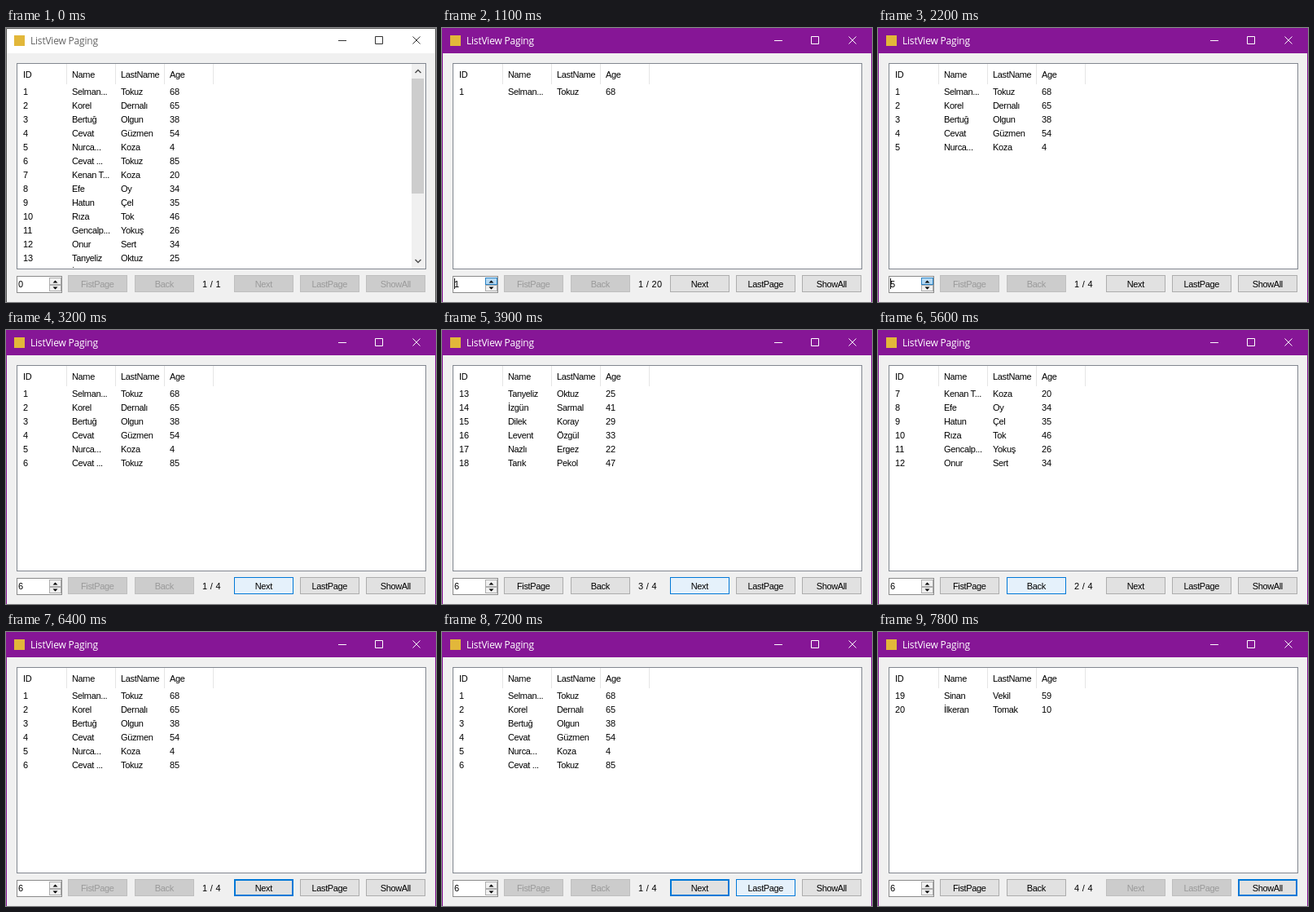
Animation of 528 by 336 pixels, one loop 8 s. Source, as an HTML page:

```html
<!DOCTYPE html>
<html lang="en">
<head>
<meta charset="utf-8">
<title>ListView Paging</title>
<style>
html, body { margin: 0; width: 100%; height: 100%; overflow: hidden; background: #f0f0f0; }
svg { display: block; width: 528px; height: 336px; }
text { font: 11px "Liberation Sans", Arial, sans-serif; fill: #000; letter-spacing: -.35px; }
text.num { letter-spacing: 0; }
text.page { letter-spacing: .3px; }
text.title { font: 12px "Open Sans", "Noto Sans", sans-serif; letter-spacing: -.2px; }
</style>
</head>
<body>
<script>
const LOOP = 8000;
const PURPLE = '#861696', BLUE = '#0078d7';

const people = [
  ['Selman...', 'Tokuz', 68], ['Korel', 'Dernalı', 65], ['Bertuğ', 'Olgun', 38],
  ['Cevat', 'Güzmen', 54], ['Nurca...', 'Koza', 4], ['Cevat ...', 'Tokuz', 85],
  ['Kenan T...', 'Koza', 20], ['Efe', 'Oy', 34], ['Hatun', 'Çel', 35],
  ['Rıza', 'Tok', 46], ['Gencalp...', 'Yokuş', 26], ['Onur', 'Sert', 34],
  ['Tanyeliz', 'Oktuz', 25], ['İzgün', 'Sarmal', 41], ['Dilek', 'Koray', 29],
  ['Levent', 'Özgül', 33], ['Nazlı', 'Ergez', 22], ['Tarık', 'Pekol', 47],
  ['Sinan', 'Vekil', 59], ['İlkeran', 'Tomak', 10]
];

const buttons = [
  ['first', 'FistPage', 76], ['back', 'Back', 158], ['next', 'Next', 280],
  ['last', 'LastPage', 361], ['all', 'ShowAll', 442]
];

// Each step lists only what changes at that time.
const steps = [
  [0, { active: false, size: 0, page: 1, caret: false, spin: '', min: false, hover: '', press: '', focus: '' }],
  [100, { min: true }],
  [200, { min: false }],
  [800, { spin: 'hover' }],
  [1000, { active: true, spin: 'press', caret: true }],
  [1100, { size: 1 }],
  [1200, { spin: 'hover' }],
  [1400, { size: 2, spin: 'press' }],
  [1500, { spin: 'hover' }],
  [1700, { size: 3, spin: 'press' }],
  [1800, { spin: 'hover' }],
  [1900, { size: 4, spin: 'press' }],
  [2000, { spin: 'hover' }],
  [2200, { size: 5, spin: 'press' }],
  [2300, { spin: 'hover' }],
  [2600, { size: 6, spin: 'press' }],
  [2700, { spin: 'hover' }],
  [2800, { spin: '' }],
  [3200, { caret: false, hover: 'next' }],
  [3400, { press: 'next' }],
  [3600, { page: 2, press: '', focus: 'next' }],
  [3800, { press: 'next' }],
  [3900, { page: 3, press: '' }],
  [4300, { page: 4, hover: '', focus: 'all' }],
  [4600, { hover: 'back' }],
  [5100, { page: 3, press: 'back', focus: 'back' }],
  [5200, { press: '' }],
  [5400, { press: 'back' }],
  [5500, { page: 2, press: '' }],
  [5900, { hover: '' }],
  [6000, { hover: 'first' }],
  [6400, { page: 1, hover: '', focus: 'next' }],
  [7200, { hover: 'last' }],
  [7700, { page: 4, hover: '', focus: 'all' }]
];

const NS = 'http://www.w3.org/2000/svg';
const svg = document.createElementNS(NS, 'svg');
svg.setAttribute('viewBox', '0 0 528 336');
document.body.append(svg);

function set(node, attrs) {
  for (const key in attrs) node.setAttribute(key, attrs[key]);
  return node;
}
function add(tag, attrs, parent = svg) {
  return parent.appendChild(set(document.createElementNS(NS, tag), attrs));
}
const rect = (x, y, width, height, fill, parent) =>
  add('rect', { x, y, width, height, fill }, parent);
const box = (x, y, w, h, fill, stroke, parent) =>
  set(rect(x + .5, y + .5, w - 1, h - 1, fill, parent), { stroke });
const line = (d, stroke, parent, width = 1) =>
  add('path', { d, stroke, fill: 'none', 'stroke-width': width }, parent);
function label(x, y, str, attrs = {}, parent) {
  const node = add('text', { x, y, ...attrs }, parent);
  node.textContent = str;
  return node;
}

// Window frame and caption
rect(0, 0, 528, 336, '#f0f0f0');
const bar = rect(0, 0, 528, 31, '#fff');
const edge = line('M.5 336V.5H527.5V336', '#555');
const minBg = rect(390, 1, 45, 29, '#e5e5e5');
rect(10, 9, 13, 13, '#e2b73a');
const title = label(30, 20, 'ListView Paging', { class: 'title' });
const glyphs = [
  line('M408 15.5H418', '#333'),
  line('M453.5 10.5H462.5V19.5H453.5Z', '#333'),
  line('M499.5 10.5L508.5 19.5M508.5 10.5L499.5 19.5', '#333')
];

// List
box(13, 43, 503, 253, '#fff', '#828790');
['ID', 'Name', 'LastName', 'Age'].forEach((str, i) => {
  label(21 + 60 * i, 61, str);
  line(`M${74.5 + 60 * i} 44V69`, '#e5e5e5');
});
add('rect', { x: 14, y: 44, width: 501, height: 251 }, add('clipPath', { id: 'view' }));
const list = add('g', { 'clip-path': 'url(#view)' });
const rows = Array.from({ length: 14 }, (_, r) =>
  [0, 1, 2, 3].map(c =>
    label(21 + 60 * c, 82 + 17 * r, '', { class: c % 3 ? '' : 'num' }, list)));

const scroll = add('g', {});
rect(498, 44, 17, 251, '#f0f0f0', scroll);
rect(498, 62, 15, 141, '#cdcdcd', scroll);
line('M502.5 55L506 51.5L509.5 55M502.5 284L506 287.5L509.5 284', '#505050', scroll, 1.5);

// Page size spinner
box(13, 304, 56, 21, '#fff', '#8a8a8a');
const up = box(53, 306, 15, 9, '#f0f0f0', '#adadad');
box(53, 315, 15, 8, '#f0f0f0', '#adadad');
add('path', { d: 'M57.5 312.5H63.5L60.5 309.5ZM57.5 317.5H63.5L60.5 320.5Z' });
const sizeText = label(15, 318, '', { class: 'num' });
const caret = rect(15, 307, 1, 13, '#000');

// Pager
const pageText = label(241, 318, '', { class: 'page' });
const pager = buttons.map(([id, str, x]) => ({
  id, x,
  face: rect(x, 303, 73, 21),
  text: label(x + 36.3, 318, str, { 'text-anchor': 'middle' })
}));

function paintButton(b, s, pages) {
  const off = !s.size || (s.page === 1 && (b.id === 'first' || b.id === 'back'))
    || (s.page === pages && (b.id === 'next' || b.id === 'last'));
  let fill = '#e1e1e1', stroke = '#adadad', w = 1;
  if (off) [fill, stroke] = ['#ccc', '#bfbfbf'];
  else if (s.press === b.id) [fill, stroke] = ['#cce4f7', '#005499'];
  else if (s.hover === b.id) [fill, stroke] = ['#e5f1fb', BLUE];
  else if (s.focus === b.id) [stroke, w] = [BLUE, 2];
  set(b.face, {
    x: b.x + w / 2, y: 303 + w / 2, width: 73 - w, height: 21 - w,
    fill, stroke, 'stroke-width': w
  });
  b.text.style.fill = off ? '#9a9a9a' : '#000';
}

function paint(s) {
  const ink = s.active ? '#fff' : '#333';
  set(bar, { fill: s.active ? PURPLE : '#fff' });
  set(edge, { stroke: s.active ? PURPLE : '#555' });
  title.style.fill = s.active ? '#fff' : '#666';
  glyphs.forEach(g => set(g, { stroke: ink }));
  set(minBg, { opacity: +s.min });

  const size = s.size || people.length;
  const pages = Math.ceil(people.length / size);
  const from = (s.page - 1) * size;
  rows.forEach((cells, r) => {
    const n = from + r, p = r < size && people[n];
    const data = p ? [n + 1, ...p] : ['', '', '', ''];
    cells.forEach((cell, c) => { cell.textContent = data[c]; });
  });
  set(scroll, { opacity: +!s.size });

  const [fill, stroke] = {
    '': ['#f0f0f0', '#adadad'], hover: ['#d5eafa', '#4a9fdf'], press: ['#b5d9f3', '#2b83c4']
  }[s.spin];
  set(up, { fill, stroke });
  sizeText.textContent = s.size;
  set(caret, { opacity: +s.caret });
  pageText.textContent = `${s.page} / ${pages}`;
  pager.forEach(b => paintButton(b, s, pages));
}

let shown = -1;
const start = performance.now();
function tick() {
  const t = (performance.now() - start) % LOOP;
  const past = steps.filter(([at]) => at <= t);
  if (past.length !== shown) {
    shown = past.length;
    paint(Object.assign({}, ...past.map(step => step[1])));
  }
  requestAnimationFrame(tick);
}
tick();
</script>
</body>
</html>
```
